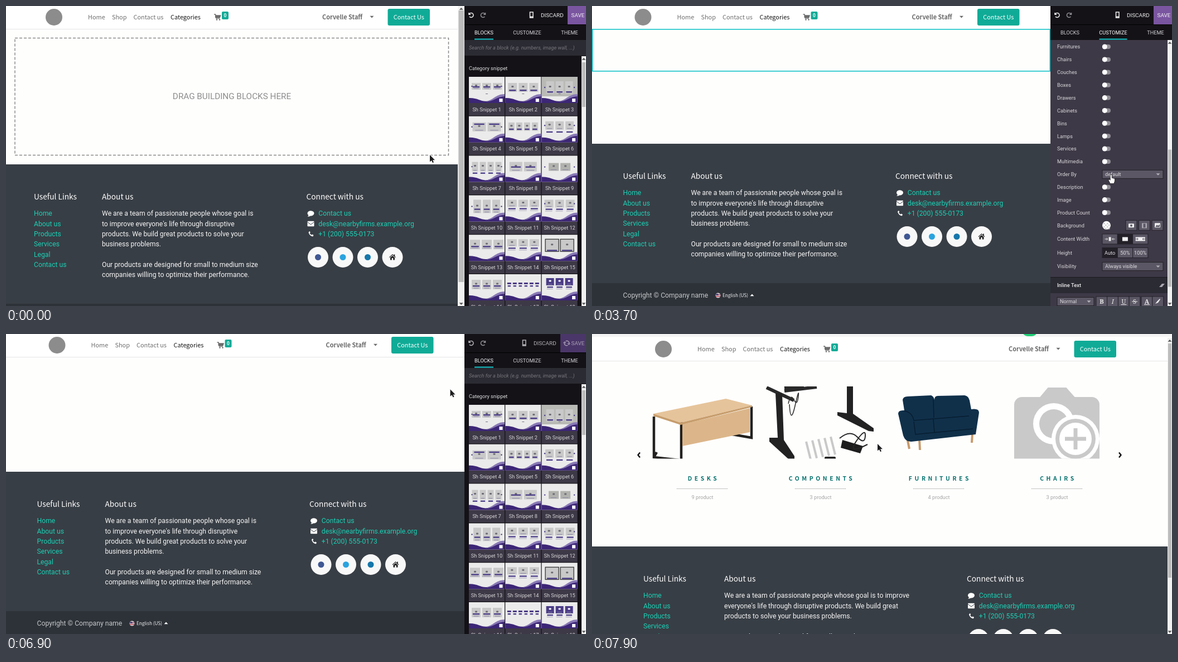
Write an HTML page with a canvas that moves like this. It is 1040 px wide and 538 px high and loops after 8000 ms.

```html
<!DOCTYPE html>
<html lang="en">
<meta charset="utf-8">
<title>Website builder</title>
<style>
html, body { margin: 0; width: 100%; height: 100%; overflow: hidden; background: #fff }
canvas { display: block }
</style>
<canvas width="1040" height="538"></canvas>
<script>
const ctx = document.querySelector('canvas').getContext('2d');
const SANS = 'Roboto, sans-serif';
const HUMANIST = '"Noto Sans CJK SC", "Noto Sans CJK JP", "Noto Sans CJK", sans-serif';
const TEAL = '#10ab97', CYAN = '#14c4c8', LINK = '#1bd0b6', PURPLE = '#4a3b86';
const DARK = '#141217', MID = '#2b2b33', LIGHT = '#3e3946';

function box(x, y, w, h, fill, r = 0) {
  ctx.fillStyle = fill;
  ctx.beginPath();
  ctx.roundRect(x, y, w, h, r);
  ctx.fill();
}
function disc(x, y, r, fill) {
  ctx.fillStyle = fill;
  ctx.beginPath();
  ctx.arc(x, y, r, 0, 7);
  ctx.fill();
}
function frame(x, y, w, h, color, width = 1) {
  ctx.strokeStyle = color;
  ctx.lineWidth = width;
  ctx.strokeRect(x, y, w, h);
}
// y is the middle of the capitals
function text(s, x, y, size, color, { style = '', font = SANS, align = 'left' } = {}) {
  ctx.font = `${style} ${size}px ${font}`;
  ctx.textAlign = align;
  ctx.fillStyle = color;
  ctx.fillText(s, x, y + size * .36);
}
const title = (s, x, y, size, color, options) =>
  text(s, x, y, size / 1.117, color, { font: HUMANIST, ...options });

function shape(d, x, y, fill, stroke, width = 1, scale = 1, turn = 0) {
  const path = new Path2D(d);
  ctx.save();
  ctx.translate(x, y);
  ctx.rotate(turn);
  ctx.scale(scale, scale);
  if (stroke) { ctx.strokeStyle = stroke; ctx.lineWidth = width; ctx.stroke(path); }
  if (fill) { ctx.fillStyle = fill; ctx.fill(path); }
  ctx.restore();
}
const caret = (x, y, color, up) => shape('M-3.5-1.7H3.5L0 2Z', x, y, color, null, 1, 1, up ? Math.PI : 0);

function scrollbar(x, top, w, from, to) {
  box(x, top, w, 538 - top, '#f1f1f1');
  box(x + 1, from, w - 2, to - from, '#bcbcbc');
  caret(x + w / 2, top + 5, '#555', true);
  caret(x + w / 2, 534, '#555');
}

// ---- website ----
const CART = 'M-6-5H-3.5L-2 2H4.5M-2.8-3H5.5L4.5 0H-2';
const PHONE = 'M-4-3C-3 2 1 4.5 4 4.5L5 2 2.4.8 1.2 2-2-1-.8-2.4-2-5Z';
const PROMISE = [
  ['We are a team of passionate people whose goal is', "to improve everyone's life through disruptive",
   'products. We build great products to solve your', 'business problems.', '',
   'Our products are designed for small to medium size', 'companies willing to optimize their performance.'],
  ['We are a team of passionate people whose goal is to improve', "everyone's life through disruptive products. We build great",
   'products to solve your business problems.', '', 'Our products are designed for small to medium size companies'],
];

function header(left, width) {
  const right = width - left;
  box(0, 0, width, 41, '#fff');
  box(0, 41, width, 1, '#e6e6e6');
  disc(left + 36, 20, 15, '#8c8c8c');
  [['Home', 97], ['Shop', 140], ['Contact us', 178.5], ['Categories', 245]].forEach(([s, x], i) =>
    title(s, left + x, 20, 12.2, i < 3 ? '#707070' : '#181818'));
  shape(CART, left + 329, 20, null, '#6c6c6c', 1.6);
  box(left + 325, 17, 9, 4, '#6c6c6c');
  disc(left + 328, 24.5, 1.3, '#6c6c6c');
  disc(left + 333, 24.5, 1.3, '#6c6c6c');
  box(left + 337, 10, 12, 14, TEAL, 2);
  title('0', left + 343, 17, 9.2, '#fff', { style: 'bold', align: 'center' });
  title('Corvelle Staff', right - 193, 20, 12.2, '#6a6a6a', { style: 'bold' });
  caret(right - 104, 19.5, '#6a6a6a');
  box(right - 75.5, 5, 75.5, 30, TEAL, 3);
  title('Contact Us', right - 37.7, 20, 12.2, '#fff', { align: 'center' });
}

function footer(left, width, top, wide) {
  const about = left + (wide ? 145 : 122), connect = left + (wide ? 580 : 488.5);
  const line = i => top + 88 + 18.35 * i;
  box(0, top, width, 260, '#383e45');
  title('Useful Links', left, top + 58, 15.3, '#fff');
  title('About us', about, top + 58, 15.3, '#fff');
  title('Connect with us', connect, top + 58, 15.3, '#fff');
  ['Home', 'About us', 'Products', 'Services', 'Legal', 'Contact us'].forEach((s, i) =>
    text(s, left, line(i), 12.2, LINK));
  PROMISE[+wide].forEach((s, i) => text(s, about, line(i), 12.2, '#f7f7f7'));
  ['Contact us', 'desk@nearbyfirms.example.org', '+1 (200) 555-0173'].forEach((s, i) =>
    text(s, connect + 21.8, line(i), 12.2, LINK));
  const icon = connect + 8;
  shape('M-6 0A6 4.6 0 1 1-1 4.4Q-3 6-6 5.5-4 4-4 3.2Q-6 2-6 0Z', icon, line(0), '#fff');
  box(icon - 6, line(1) - 4.5, 12, 9.5, '#fff', 1);
  shape('M-6-3L0 1.6 6-3', icon, line(1), null, '#383e45');
  shape(PHONE, icon, line(2), '#fff');
  ['#3f5793', '#2aa3df', '#1577ab', '#222'].forEach((color, i) => {
    const x = connect + 21 + 44.5 * i, y = top + 166.5;
    disc(x, y, 18.5, '#f8f8f8');
    if (i < 3) disc(x, y, 5.5, color);
    else shape('M-6 0L0-5.5 2.5-3.2V-5H4.3V-1.6L6 0 5.2.8 0-4-5.2.8ZM-4 .7L0-2.8 4 .7V5H1.2V1.6H-1.2V5H-4Z', x, y, color);
  });
  const base = top + 250;
  box(0, base, width, 60, '#2d3238');
  text('Copyright © Company name', left, base + 22, 12.2, '#c6c8ca');
  disc(left + 170.5, base + 22, 4.5, '#d9cdd2');
  box(left + 166.5, base + 20, 8, 1.3, '#b53a48');
  box(left + 166.5, base + 23, 8, 1.3, '#b53a48');
  box(left + 167, base + 19, 4, 3, '#3b4a80');
  title('English (US)', left + 178.5, base + 22, 9.2, '#f4f4f4', { style: '500' });
  caret(left + 231.5, base + 21.5, '#fff', true);
}

function dropZone() {
  ctx.setLineDash([5, 3]);
  frame(16, 57.5, 777.5, 210, '#8a8a8a', 1.5);
  ctx.setLineDash([]);
  text('DRAG BUILDING BLOCKS HERE', 405, 162, 15.27, '#8d8d8d', { align: 'center' });
}

function selection(fill, handles) {
  if (fill) {
    box(0, 42, 822, 75, '#e5f8f6');
    box(0, 78, 822, 2, '#dcf4f3');
  }
  frame(.8, 41.8, 820.4, 75, CYAN, 1.6);
  if (!handles) return;
  for (const y of [66, 93]) {
    box(403, y - 7.5, 15, 15, '#8b8e8e');
    shape('M0-5V4M-4 0L0 4 4 0', 410.5, y, null, '#fff', 2);
  }
  box(390, 22, 23, 17.5, '#3e3946', 1);
  for (let i = 0; i < 6; i++) box(397 + i % 3 * 4, 27 + (i / 3 | 0) * 4, 2.6, 2.6, '#fff');
  box(414.5, 22, 17.5, 17.5, '#6b4148', 1);
  trash(423, 31, '#e8c9cb');
}
const trash = (x, y, color) =>
  shape('M-4-3H4M-1.5-4.5H1.5M-3-3V4.3H3V-3M-1-1V2.5M1-1V2.5', x, y, null, color, 1.1);

// ---- category carousel ----
function desk() {
  shape('M111 148V221L156 226M160 158V224M286 130V186L246 179V170M116 212L111 221', 0, 0, null, '#23211f', 4.5);
  shape('M162 162L283 133V176L162 201Z', 0, 0, '#dcb68a');
  shape('M110 143L240 116 287 128 159 159Z', 0, 0, '#e6c49b');
  shape('M110 143L159 159 287 128V131L159 163 110 147Z', 0, 0, '#c79d6c');
}
function deskFrame() {
  shape('M313 96L362 119M345 102L403 95M345 97L380 94', 0, 0, null, '#292929', 6);
  shape('M329 106H341L344 190 363 219V224H352L318 193V186H333ZM457 94H468V143L505 169V175L496 174 440 146V140L457 142Z', 0, 0, '#222');
  shape('M352 125Q356 106 362 118T370 112 364 129 354 126', 0, 0, null, '#333', 1.6);
  for (let i = 0; i < 5; i++) shape('M0 0L8 32', 384 + i * 11, 193 - i * 2.2, null, '#c9c9c9', 4);
  shape('M449 190L486 201 481 214 446 204Z', 0, 0, '#1d1d1d');
  shape('M444 187Q463 171 476 185T490 183 474 192 494 198', 0, 0, null, '#262626', 2);
  box(417, 220, 20, 5, '#222', 2);
}
function sofa() {
  shape('M565 186L569 206M682 179L681 195M587 188L588 208', 0, 0, null, '#c89a6b', 4);
  shape('M557 118Q558 112 566 112L608 110Q613 112 614 118 614 111 620 111L668 110Q675 111 677 119L680 135Q694 133 694 141L688 180 573 193Q562 194 558 182L549 143Q549 136 560 137Z', 0, 0, '#10304a');
  shape('M560 138Q574 140 577 155L676 147M612 116L613 150M577 157L580 180 683 170M612 152L614 176', 0, 0, null, '#071d30', 1.5);
}
function cameraPlaceholder() {
  const gray = '#c9c9c9';
  box(757, 113, 153, 130, gray, 14);
  shape('M803 115L818 97H850L866 115Z', 0, 0, gray, gray, 2);
  disc(828, 161, 37, '#fff');
  disc(828, 161, 26, gray);
  disc(867, 188, 43, '#fff');
  disc(867, 188, 36, gray);
  disc(867, 188, 29, '#fff');
  box(848, 184.5, 38, 7, gray);
  box(863.5, 169, 7, 38, gray);
}
function carousel() {
  ctx.save();
  ctx.beginPath();
  ctx.rect(90, 94, 850, 129.5);
  ctx.clip();
  desk(); deskFrame(); sofa(); cameraPlaceholder();
  ctx.restore();
  [['DESKS', 9], ['COMPONENTS', 3], ['FURNITURES', 4], ['CHAIRS', 3]].forEach(([name, count], i) => {
    const x = 198 + 212 * i;
    ctx.letterSpacing = '4.6px';
    title(name, x + 2, 259, 11.6, '#04716c', { style: 'bold', align: 'center' });
    ctx.letterSpacing = '0px';
    ctx.setLineDash([1, 1]);
    shape('M-46 0H46', x, 277.5, null, '#8a8a8a');
    ctx.setLineDash([]);
    text(count + ' product', x, 293, 9.2, '#a5a5a5', { align: 'center' });
  });
  shape('M2-4.5L-1.5 0 2 4.5', 84, 217, null, '#111', 2.4);
  shape('M-2-4.5L1.5 0-2 4.5', 947, 217, null, '#111', 2.4);
}

// ---- editor panel ----
// count, tile width, top, height, bar position
const THUMBS = [
  [3, 16, 11, 12, 17], [3, 16, 11, 16, 23], [3, 14, 8, 22, 26], [2, 24, 11, 16, 13], [4, 11, 11, 15, 22], [3, 15, 9, 15, 27],
  [4, 11, 11, 17, 30], [2, 23, 11, 17, 19], [2, 18, 13, 14, 0], [3, 14, 8, 24, 24], [3, 17, 8, 13, 23], [3, 16, 8, 14, 24],
  [3, 18, 9, 17, 20], [3, 17, 8, 13, 23], [2, 24, 8, 22, 27], [3, 16, 10, 17, 20], [6, 7, 15, 3, 20], [3, 14, 7, 13, 22],
];
function thumb(i, paper) {
  const [n, w, y, h, bar] = THUMBS[i], solid = i > 15;
  box(0, 0, 64, 47, paper);
  if (i === 2) box(0, 0, 64, 35, '#b9bab6');
  for (let k = 0; k < n; k++) {
    const x = 32 + (k - (n - 1) / 2) * (w + 3) - w / 2;
    box(x, y, w, h, solid ? PURPLE : i === 8 ? '#b1b2ae' : '#c9c9c9');
    if (i === 14) frame(x, y, w, h, '#333', 1.3);
    if (n < 6) {
      box(x + w / 2 - 2, y + h / 2 - 3, 4, 3, solid ? '#fff' : '#6e6d75', 1);
      box(x + w * .2, y + h - 2.5, w * .6, 1, '#8c86a6');
    }
    if (bar) box(x + w * .12, bar, w * .76, 2.3, PURPLE);
    if (i > 9 && i < 14 || i === 17) box(x + 1, bar + 4, w - 3, 1, '#a8a4b8');
  }
  if (i % 3 !== 1 && i < 12) for (const x of [5.5, 58.5]) disc(x, y + h / 2, 1.2, PURPLE);
  if (i < 3) box(30, 30, 4, 1, '#77737f');
  shape('M0 38C18 37 24 48 38 42S56 33 64 33V47H0Z', 0, 0, '#3c2676');
  shape('M30 45C42 43 48 31 64 31V35C50 36 44 44 30 45Z', 0, 0, '#8878b5');
  box(54.5, 39, 6, 6, '#fff');
}
function blocks() {
  box(822, 61, 218, 477, DARK);
  box(822, 61, 218, 28, MID);
  text('Search for a block (e.g. numbers, image wall, ...)', 830, 75, 9.2, '#77757c', { style: 'italic' });
  text('Category snippet', 830, 112, 9.2, '#dedede');
  for (let i = 0; i < 18; i++) {
    const x = 830 + i % 3 * 65.3, y = 127 + (i / 3 | 0) * 70.8;
    box(x, y, 64, 69.5, LIGHT);
    ctx.save();
    ctx.translate(x, y);
    thumb(i, '#ebebeb');
    ctx.restore();
    text('Sh Snippet ' + (i + 1), x + 32, y + 58.3, 9.2, '#d6d5d8', { align: 'center' });
  }
  scrollbar(1032, 90, 8, 101, 181);
}

const ROWS = ('Animation|Margin Top|Margin Right|Margin Bottom|Margin Left|Padding Top|Padding Right|Padding Bottom|' +
  'Padding Left|Box Shadow|Box Shadow Hov...|Desks|Components|Furnitures|Chairs|Couches|Boxes|Drawers|Cabinets|Bins|' +
  'Lamps|Services|Multimedia|Order By|Description|Image|Product Count|Background|Content Width|Height|Visibility').split('|');
const CHOICES = { 0: 'None', 9: 'None', 10: 'None', 23: 'default', 30: 'Always visible' };
const VALUES = { 1: '0', 5: '50', 6: '0' };
const SWITCHED = { 24: 3900, 25: 4600, 26: 5000 };

function cell(x, y, w, active) {
  box(x, y - 9, w, 18, active ? '#232028' : '#5b5764');
  frame(x, y - 9, w, 18, '#24212a');
}
function select(s, x, y, w) {
  box(x, y - 7.5, w, 15, '#5b5764');
  frame(x, y - 7.5, w, 15, '#211f26');
  text(s, x + 5, y, 9.2, '#dddbe0');
  caret(x + w - 9, y, '#b5b2ba');
}
function control(i, y, t) {
  if (i in CHOICES) select(CHOICES[i], 915, y, 109);
  else if (i < 9) {
    box(915, y - 7.5, 45, 15, '#2a2830');
    frame(915, y - 7.5, 45, 15, '#131116');
    text(VALUES[i] || '', 943, y, 10, '#dddbe0', { font: '"DejaVu Sans Mono", monospace', align: 'right' });
    text('px', 946.5, y, 9, '#8f8c95');
  } else if (i < 27) {
    const on = t >= SWITCHED[i];
    box(915, y - 4, 15, 8, on ? CYAN : '#918e96', 4);
    disc(on ? 925.5 : 919.3, y, 4.5, '#fff');
  } else if (i === 27) {
    disc(922.5, y, 7.5, '#fff');
    for (let k = 0; k < 8; k++) box(917 + k % 4 * 3, y - 4.5 + ((k >> 2) * 2 + k % 2) * 3, 2.5, 2.5, '#ccc');
    for (const x of [957, 980.5, 1004]) cell(x, y, 20);
    box(962, y - 3, 10, 7, '#eee', 1);
    disc(967, y + .5, 2, '#5b5764');
    box(986, y - 4, 9, 9, '#aaa7b0');
    box(988.5, y - 3, 4, 7, '#5b5764');
    box(1009, y - 4, 10, 8, '#eee', 1);
    shape('M-4 3L-1-1 1 1 4-2V3Z', 1014, y, '#5b5764');
  } else {
    for (let k = 0; k < 3; k++) {
      const x = 915 + 27.3 * k, c = x + 13.6;
      cell(x, y, 27.3, k === (i === 28 ? 1 : 0));
      if (i === 29) text(['Auto', '50%', '100%'][k], c, y, 9.2, '#e2e0e5', { align: 'center' });
      else {
        const w = [4, 10, 17][k];
        box(c - w / 2, y - 3.5, w, 7, '#f1f0f2');
        if (k !== 1) shape('M-9 0H-4M-6-2L-4 0-6 2M9 0H4M6-2L4 0 6 2', c, y, null, k ? '#5b5764' : '#ddd');
      }
    }
  }
}
function customize(t) {
  const scroll = 364 * Math.min(1, Math.max(0, (t - 3000) / 600));
  ctx.save();
  ctx.beginPath();
  ctx.rect(822, 61, 218, 477);
  ctx.clip();
  box(822, 61, 218, 477, LIGHT);
  ctx.translate(0, -scroll);
  const bar = (s, y, h) => {
    box(822, y, 210, h, MID);
    box(822, y - 1, 210, 1, '#1c1a20');
    text(s, 834, y + h / 2, 9.3, '#ececee', { style: '500' });
  };
  bar('Page Options', 61, 27);
  bar('Sh Snippet 7', 98, 29);
  const gray = '#a9a6ae';
  shape('M-3.5-1L-1-3.5 1-1.5M3.5 1L1 3.5-1 1.5M-1.5-1.5L1.5 1.5', 940, 113, null, gray, 1.3);
  frame(954.5, 109.5, 7.5, 7, gray);
  box(956.5, 109.5, 3.5, 2.5, gray);
  frame(973.5, 108, 5.5, 10, gray, 1.2);
  frame(992, 108.5, 6, 6, gray);
  frame(994, 110.5, 6, 6, gray);
  trash(1016, 113, '#ccc');
  ROWS.forEach((s, i) => {
    const y = 139.6 + 22.88 * i + Math.max(0, i - 27) * 1.7;
    text(s, 834, y, 9.2, '#d8d6db');
    control(i, y, t);
  });
  bar('Inline Text', 851, 28);
  shape('M-5 3L0-3H5L0 3Z', 1022, 865, gray);
  select('Normal', 834, 894, 66);
  [...'BIUSA'].forEach((s, i) => {
    const x = i < 4 ? 904 + 19.7 * i : 985;
    cell(x, 894, 19.7);
    text(s, x + 10, 894, 11, '#eee', { style: ['bold', 'italic', '', '', 'bold'][i], font: '"Noto Serif", serif', align: 'center' });
    if (i > 1) box(x + 5, i === 3 ? 893.5 : 899, 10, 1, '#eee');
  });
  cell(1004.7, 894, 20);
  shape('M4-5L-1 0-4 4 1 2 5-4Z', 1014, 894, '#eee');
  ctx.restore();
  scrollbar(1032, 61, 8, 70 + scroll * .515, 316 + scroll * .515);
}

function panel(t) {
  const saving = t >= 6500, editing = t >= 2200 && !saving;
  box(822, 0, 218, 34, DARK);
  const ink = saving ? '#b5b3b8' : '#f0f0f0', shift = saving ? -13 : 0;
  const undo = 'M-3.5-4V-.8H-.3M-3.2-1A4 4 0 1 1-2.5 3';
  shape(undo, 833.5, 16, null, ink, 1.5);
  ctx.save();
  ctx.translate(856, 16);
  ctx.scale(-1, 1);
  shape(undo, 0, 0, null, '#8f8d92', 1.5);
  ctx.restore();
  frame(939.5 + shift, 11, 5.5, 10, ink, 1.5);
  box(939 + shift, 18.5, 6, 2, ink);
  text('DISCARD', 959 + shift, 16.5, 9.95, ink);
  box(1007 + shift, 0, 46, 33, saving ? '#4a3668' : '#7a55a0');
  text('SAVE', 1013.5, 16.5, 9.95, saving ? '#aaa0b6' : '#f4f0f7');
  if (saving) shape('M-4-.5A4 4 0 0 1 3-3M4-4.5V-1.5H1M4 .5A4 4 0 0 1-3 3M-4 4.5V1.5H-1', 1005.5, 16.5, null, '#aaa0b6', 1.3, 1, (t - 6600) / 2000 * 2 * Math.PI);
  box(822, 34, 218, 27, DARK);
  box(822, 33, 218, 1, '#000');
  [['BLOCKS', 857], ['CUSTOMIZE', 934.5], ['THEME', 1010.5]].forEach(([s, x], i) => {
    text(s, x, 47.3, 9.2, i === +editing ? '#fff' : '#d4d3d6', { align: 'center' });
  });
  box(editing ? 909.5 : 840, 58.5, editing ? 50 : 34, 2, CYAN);
  if (editing) customize(t); else blocks();
}

// ---- pointer ----
const TRACK = [
  [0, 760, 267], [300, 760, 267], [400, 759, 267], [500, 759, 267], [600, 788, 272], [700, 788, 272], [1000, 890, 315],
  [1100, 890, 315], [1200, 820, 270], [1300, 720, 225], [1600, 560, 150], [1900, 490, 106], [2700, 490, 105],
  [3000, 931, 300], [3700, 931, 303], [3800, 923, 321], [4100, 923, 322], [4300, 923, 343], [4500, 923, 343],
  [4700, 923, 356], [4800, 923, 356], [5000, 924, 370], [5200, 924, 352], [5300, 924, 352], [5500, 923, 322],
  [5600, 923, 322], [6300, 1010, 26], [6600, 1010, 26], [7300, 512, 197], [8000, 512, 197],
];
function pointerAt(t) {
  const i = TRACK.findIndex(p => p[0] > t), [t0, x0, y0] = TRACK[i - 1], [t1, x1, y1] = TRACK[i];
  const k = (t - t0) / (t1 - t0);
  return [x0 + (x1 - x0) * k, y0 + (y1 - y0) * k];
}
function pointer(t) {
  const [x, y] = pointerAt(t);
  const dragging = t >= 1200 && t < 2000;
  if (dragging) {
    ctx.save();
    ctx.translate(x - 87, y - 59);
    ctx.rotate(-.045);
    ctx.scale(1.04, 1.06);
    ctx.translate(-32, -23.5);
    ctx.shadowColor = 'rgba(0,0,0,.35)';
    ctx.shadowBlur = 8;
    ctx.shadowOffsetY = 2;
    box(0, 0, 64, 47, '#fff');
    ctx.shadowColor = 'transparent';
    thumb(6, '#fbfbfb');
    ctx.restore();
    shape('M0-7L2.5-4H1V-1H4V-2.5L7 0 4 2.5V1H1V4H2.5L0 7-2.5 4H-1V1H-4V2.5L-7 0-4-2.5V-1H-1V-4H-2.5Z', x, y, '#222', '#fff', 2);
  } else if (x > 822 && (t < 1200 || t > 2800 && t < 6000)) {
    shape('M-1.3 0H.8V5.5L6 7V11L4.5 15H-1.5L-4.5 9.5-3.4 8.3-1.3 10Z', x, y, '#fff', '#333', 1.4);
  } else {
    shape('M0 0V12.5L3 10 5 14.3 7 13.3 5.1 9.2H9Z', x, y, '#1d1d1d', '#fff', 1.8);
  }
}

function draw(t) {
  const done = t >= 7400, fresh = t < 1200, loaded = t >= 7700;
  const width = done ? 1032 : fresh ? 810 : 822, left = done ? 92 : fresh ? 50 : 55.5;
  const drop = t >= 7900 ? 7 : 0;
  box(0, 0, 1040, 538, '#fefefd');
  ctx.save();
  ctx.translate(0, drop);
  header(left, width);
  footer(left, width, loaded ? 374 : fresh ? 284 : 247, done);
  ctx.restore();
  if (fresh) dropZone();
  if (t >= 2100 && t < 6500) selection(t < 2800, t < 2800 || t >= 5900);
  if (loaded) carousel();
  if (drop) {
    box(0, 0, 1040, 5, '#f4f4f4');
    box(772, -14, 26, 18, '#1fce74', 9);
  }
  if (done) scrollbar(1032, drop, 8, drop + 10, 437);
  else {
    if (fresh) scrollbar(810.5, 0, 11.5, 8, 495);
    panel(t);
  }
  pointer(t);
}

function tick(now) {
  draw(Math.floor(now % 8000 / 100) * 100);
  requestAnimationFrame(tick);
}
requestAnimationFrame(tick);
</script>
</html>
```
